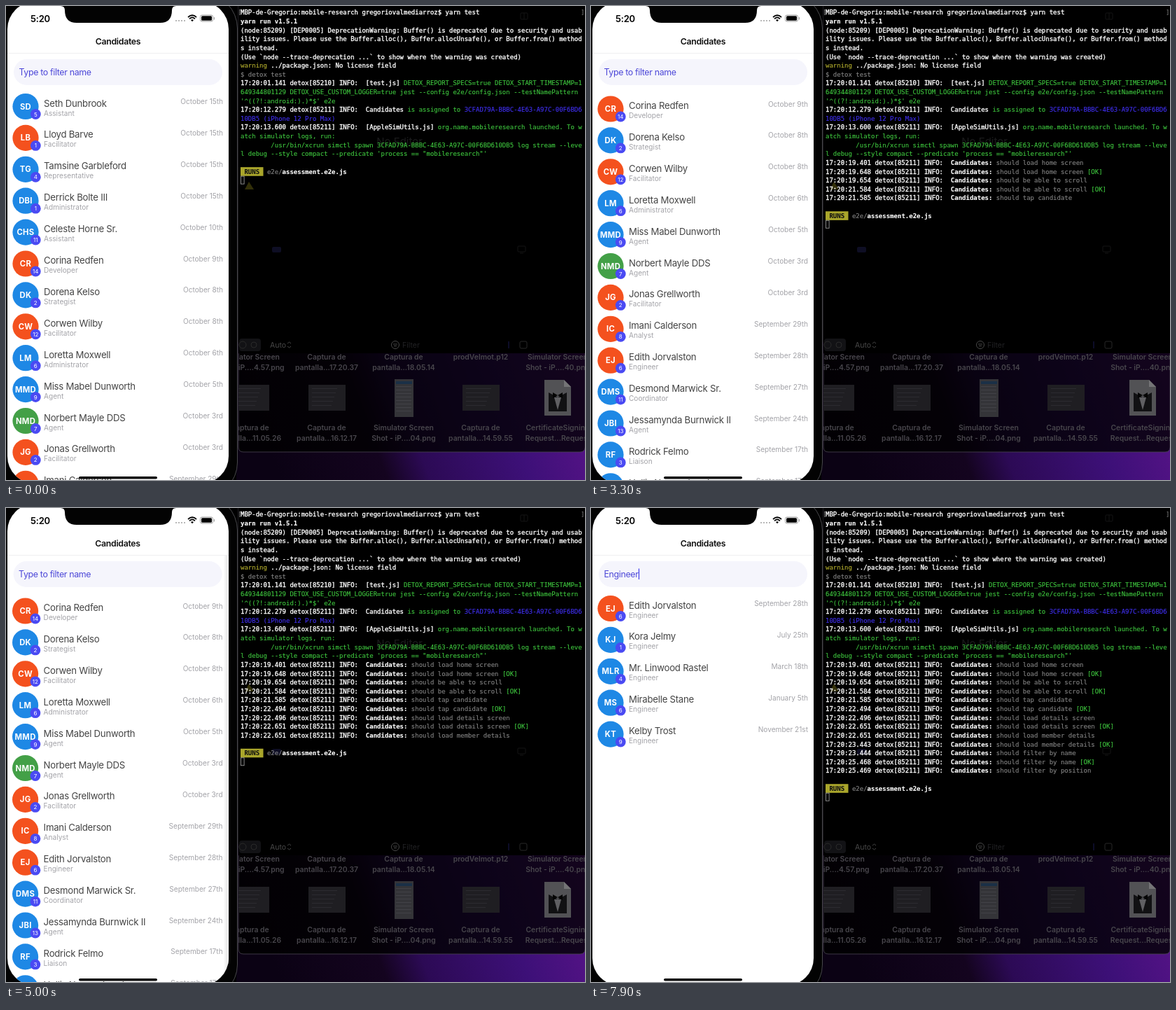
Animation of 827 by 677 pixels, one loop 8000 ms. Source, as an HTML page:

```html
<!DOCTYPE html>
<html lang="en">
<head>
<meta charset="utf-8">
<title>Candidates test run</title>
<style>
  html, body { margin: 0; width: 100%; height: 100%; overflow: hidden; background: #000; }
  svg { display: block; width: 827px; height: 677px; }
  text { white-space: pre; font-family: Inter, "Open Sans", sans-serif; }
  .term text { font: 9px "DejaVu Sans Mono", "Liberation Mono", monospace; }
  .term .bold { font-weight: 700; }
  .name { font-size: 13.2px; letter-spacing: -.25px; fill: #444; }
  .small { font-size: 10.1px; fill: #a3a3a8; }
  .initials { font-weight: 700; fill: #fff; text-anchor: middle; }
  .title { font-size: 12.3px; font-weight: 600; letter-spacing: -.3px; fill: #111; text-anchor: middle; }
  .label { font-size: 13px; letter-spacing: -.2px; fill: #b3b3b9; }
  .field { font-size: 12.4px; letter-spacing: -.35px; fill: #4d48d8; }
  .icon { font-size: 10.4px; font-weight: 600; fill: #48464c; text-anchor: middle; }
  .end { text-anchor: end; }
</style>
</head>
<body>
<svg id="stage" viewBox="0 0 827 677">
  <defs>
    <linearGradient id="wall" x1="0" y1=".15" x2="1" y2="0">
      <stop offset="0" stop-color="#0b0214"/><stop offset=".3" stop-color="#14041f"/>
      <stop offset=".42" stop-color="#2c0a55"/><stop offset=".7" stop-color="#3d1078"/>
      <stop offset="1" stop-color="#5f148c"/>
    </linearGradient>
    <linearGradient id="shade" x1="0" x2="1">
      <stop offset="0" stop-opacity="0"/><stop offset="1" stop-opacity=".1"/>
    </linearGradient>
    <clipPath id="right"><rect x="332" y="496" width="495" height="141"/></clipPath>
    <clipPath id="screen"><rect x="2" y="-6" width="316" height="688" rx="39"/></clipPath>
    <clipPath id="body"><rect x="2" y="68" width="316" height="620"/></clipPath>
    <clipPath id="viewport"><rect x="2" y="121" width="316" height="560"/></clipPath>
  </defs>
  <rect width="827" height="677"/>
  <rect x="329" y="480" width="498" height="197" fill="url(#wall)"/>
  <path d="M332 0H827V630Q827 637 820 637H339Q332 637 332 630Z" fill="#000" fill-opacity=".79" stroke="#4b4651" stroke-width=".8"/>
  <g id="desktop" clip-path="url(#right)"></g>
  <rect x="332" width="495" height="496" fill="#000"/>
  <g id="editor" fill="none" stroke="#141415">
    <text x="562" y="199" font-size="15" text-anchor="middle" fill="#1b1b1c" stroke="none">No Editor</text>
    <path d="M347 251L354 262H341Z" fill="#333009" stroke="none"/>
    <rect x="380" y="344" width="13" height="8" rx="2" fill="#0e0e24" stroke="none"/>
    <rect x="731" y="343" width="11" height="8" rx="1"/><path d="M734 353H739"/>
    <rect x="735" y="10" width="10" height="9" rx="1"/><path d="M740 10V19"/>
    <rect x="333" y="475" width="31" height="18" rx="4" fill="#121215" stroke="none"/>
    <circle cx="338" cy="484" r="5" stroke="#2a2a2a"/><circle cx="354" cy="484" r="4" stroke="#2a2a2a"/>
    <text x="377" y="488" font-size="10.5" fill="#484848" stroke="none">Auto</text>
    <path d="M402 482L404.500 480L407 482M402 486L404.500 488L407 486" stroke="#484848"/>
    <circle cx="556" cy="484" r="5.500" stroke="#484848"/><path d="M553 483H559M554 485.500H558" stroke="#484848"/>
    <text x="566" y="488" font-size="10.500" fill="#222224" stroke="none">Filter</text>
    <path d="M718 479V489" stroke="#191950"/><rect x="734" y="479" width="10" height="10" rx="2" stroke="#282828"/>
  </g>
  <g id="term" class="term"></g>

  <rect x="-40" y="-18" width="370.500" height="720" rx="50" fill="#030303" stroke="#48484c"/>
  <g clip-path="url(#screen)">
    <rect width="320" height="677" fill="#fff"/>
    <g clip-path="url(#body)">
      <g id="home">
        <rect x="11" y="76" width="298" height="37" rx="18.500" fill="#f5f5fc"/>
        <text id="query" class="field" x="18.500" y="99"></text>
        <rect id="caret" y="86.500" width="1.300" height="15.500" fill="#4b48ee"/>
        <g id="lists" clip-path="url(#viewport)"></g>
        <rect id="thumb" x="313" width="2.500" height="50" rx="1.200" fill="#a2a2a2"/>
      </g>
      <g id="detail">
        <rect x="-4" y="67" width="6" height="620" fill="url(#shade)"/>
        <rect x="2" y="67" width="320" height="620" fill="#fff"/>
        <circle cx="159.500" cy="129.500" r="55.300" fill="#1e88e5"/>
        <text class="initials" x="158.500" y="141.500" font-size="34">JBI</text>
      </g>
    </g>
    <path d="M2 67.500H318" stroke="#efeff1"/>
    <text id="homeTitle" class="title" x="160" y="55">Candidates</text>
    <text id="detailTitle" class="title" x="160" y="55">Jessamynda Burnwick II</text>
    <g id="back">
      <path d="M16.500 45L10 51L16.500 57" fill="none" stroke="#0a7aff" stroke-width="2" stroke-linecap="round" stroke-linejoin="round"/>
      <text x="22" y="55.500" font-size="12.600" letter-spacing="-.25" fill="#0a7aff">Back</text>
    </g>
    <text x="49" y="22.500" font-size="13" font-weight="600" text-anchor="middle" letter-spacing="-.2">5:20</text>
    <path d="M242 21H256" stroke="#b8b8b8" stroke-width="2" stroke-dasharray="2 2"/>
    <path d="M260 16Q266 10.500 272 16M262 18.300Q266 14.600 270 18.300" fill="none" stroke="#000" stroke-width="1.700"/>
    <path d="M264 20Q266 18.300 268 20L266 22.200Z"/>
    <rect x="277.500" y="13" width="18" height="9" rx="2.500" fill="none" stroke="#999"/>
    <rect x="279" y="14.300" width="15" height="6.400" rx="1.500"/><path d="M297.500 16V19.500" stroke="#999"/>
    <path d="M78 0Q84 0 84 6Q84 24 101 24H220Q237 24 237 6Q237 0 243 0Z" fill="#030303"/>
    <rect x="104" y="672" width="112" height="3.600" rx="1.800"/>
    <circle id="touch" fill="#fff" fill-opacity=".55" stroke="#8f8f8f" stroke-width="1.300"/>
  </g>
</svg>
<script>
const LOOP = 8000, TICK = 100, ROW = 44.9, SCROLL = 221;
const $ = id => document.getElementById(id);
const clamp = x => Math.max(0, Math.min(1, x));

function add(parent, tag, attrs, text) {
  const node = document.createElementNS('http://www.w3.org/2000/svg', tag);
  for (const key in attrs) node.setAttribute(key, attrs[key]);
  if (text !== undefined) node.textContent = text;
  return parent.appendChild(node);
}
const show = (node, visible) => node.setAttribute('display', visible ? 'inline' : 'none');
const shift = (node, x, y = 0) => node.setAttribute('transform', `translate(${x} ${y})`);

// Desktop icons
const capture = time => ['Captura de', 'pantalla...' + time];
const shot = end => ['Simulator Screen', `Shot - iP....${end}.png`];
const icons = [
  [shot('4.57'), capture('17.20.37'), capture('18.05.14'), ['prodVelmot.p12'], shot('40')],
  [capture('11.05.26'), capture('16.12.17'), shot('04'), capture('14.59.55'), ['CertificateSigning', 'Request...Request']]
];
icons.forEach((row, r) => row.forEach((label, c) => label.forEach((line, i) =>
  add($('desktop'), 'text', { class: 'icon', x: 348 + c * 110, y: 505 + r * 101 + i * 14.5 }, line))));
for (const x of [323, 432, 652]) {
  add($('desktop'), 'rect', { x, y: 541, width: 53, height: 37, fill: '#1f1e22' });
  for (let y = 546; y < 574; y += 6)
    add($('desktop'), 'rect', { x: x + 5, y, width: 20 + y * 7 % 22, height: 1, fill: '#2c2b30' });
}
add($('desktop'), 'rect', { x: 555, y: 533, width: 27, height: 54, fill: '#343438' });
add($('desktop'), 'rect', { x: 557, y: 536, width: 23, height: 4, fill: '#1b3047' });
for (let y = 543; y < 580; y += 5) add($('desktop'), 'rect', { x: 557, y, width: 22, height: 1, fill: '#424247' });
add($('desktop'), 'path', { d: 'M769 534H797L807 544V585H769Z', fill: '#525255' });
add($('desktop'), 'path', { d: 'M797 534V544H807Z', fill: '#747476' });
add($('desktop'), 'path', { d: 'M775 552L788 559L801 552V579H775Z', fill: '#111113' });
add($('desktop'), 'path', { d: 'M783 559L788 577L793 559Z', fill: '#606063' });
add($('desktop'), 'path', { d: 'M781 552L788 556L795 552V560L788 556L781 560Z', fill: '#050505' });

// Terminal: the first letter of each span picks its colour
const inks = { w: '#fff', b: '#fff', g: '#3fc83f', u: '#4130f5', y: '#b9b32f', d: '#858585', k: '#111' };
const LINE = 12.62;
function termLine(parent, spans, row) {
  const line = add(parent, 'text', { x: 335, y: 12.4 + row * LINE });
  for (const [ink, ...letters] of spans)
    add(line, 'tspan', {
      fill: inks[ink], stroke: inks[ink], 'stroke-width': ink === 'w' ? .35 : .12,
      class: 'bk'.includes(ink) ? 'bold' : ''
    }, letters.join(''));
  return line;
}
const stamp = (time, pid = 85211) => `w17:20:${time} detox[${pid}] INFO:  `;
const intro = [
  ['wMBP-de-Gregorio:mobile-research gregoriovalmediarroz$ yarn test'],
  ['byarn run v1.5.1'],
  ['w(node:85209) [DEP0005] DeprecationWarning: Buffer() is deprecated due to security and usab'],
  ['wility issues. Please use the Buffer.alloc(), Buffer.allocUnsafe(), or Buffer.from() method'],
  ['ws instead.'],
  ['w(Use `node --trace-deprecation ...` to show where the warning was created)'],
  ['ywarning', 'w ../package.json: No license field'],
  ['d$ detox test'],
  [stamp('01.141', 85210), 'w[test.js] ', 'gDETOX_REPORT_SPECS=true DETOX_START_TIMESTAMP=1'],
  ['g649344801129 DETOX_USE_CUSTOM_LOGGER=true jest --config e2e/config.json --testNamePattern'],
  ["g'^((?!:android:).)*$' e2e"],
  [stamp('12.279'), 'wCandidates', 'g is assigned to ', 'u3CFAD79A-BBBC-4E63-A97C-00F6BD6'],
  ['u10DB5 (iPhone 12 Pro Max)'],
  [stamp('13.600'), 'w[AppleSimUtils.js] ', 'gorg.name.mobileresearch launched. To w'],
  ['gatch simulator logs, run:'],
  ['g        /usr/bin/xcrun simctl spawn 3CFAD79A-BBBC-4E63-A97C-00F6BD610DB5 log stream --leve'],
  ['gl debug --style compact --predicate \'process == "mobileresearch"\'']
];
intro.forEach((spans, i) => termLine($('term'), spans, i));
add($('term'), 'text', { x: 331, y: 12.4, fill: '#888' }, '[');
add($('term'), 'text', { x: 821, y: 12.4, fill: '#888' }, ']');

// [time shown, log stamp, test, passed]
const logs = [
  [1100, '19.401', 'load home screen'], [1400, '19.648', 'load home screen', 1],
  [1400, '19.654', 'be able to scroll'], [3300, '21.584', 'be able to scroll', 1],
  [3300, '21.585', 'tap candidate'], [4200, '22.494', 'tap candidate', 1],
  [4200, '22.496', 'load details screen'], [4400, '22.651', 'load details screen', 1],
  [4400, '22.651', 'load member details'], [5200, '23.443', 'load member details', 1],
  [5200, '23.444', 'filter by name'], [7200, '25.468', 'filter by name', 1],
  [7200, '25.469', 'filter by position']
].map(([at, time, test, ok], i) => ({
  at, node: termLine($('term'), [stamp(time), 'bCandidates:', 'd should ' + test + ' ', ok ? 'g[OK]' : 'd'], 17 + i)
}));
const runs = add($('term'), 'g', {});
add(runs, 'rect', { x: 335, y: 3, width: 32.5, height: 12.6, fill: '#aaa62b' });
termLine(runs, ['k RUNS ', 'd e2e/', 'bassessment.e2e.js'], 0);
add(runs, 'rect', { x: 335.5, y: 16, width: 4.6, height: 11, fill: 'none', stroke: '#999', 'stroke-width': .9 });

// Candidates: name, initials, colour, badge, position, date
const colours = { b: '#1e88e5', o: '#f4511e', g: '#43a047' };
const people = `Seth Dunbrook|SD|b|5|Assistant|October 15th
Lloyd Barve|LB|o|1|Facilitator|October 15th
Tamsine Garbleford|TG|b|4|Representative|October 15th
Derrick Bolte III|DBI|b|1|Administrator|October 15th
Celeste Horne Sr.|CHS|b|11|Assistant|October 10th
Corina Redfen|CR|o|14|Developer|October 9th
Dorena Kelso|DK|b|2|Strategist|October 8th
Corwen Wilby|CW|o|12|Facilitator|October 8th
Loretta Moxwell|LM|b|6|Administrator|October 6th
Miss Mabel Dunworth|MMD|b|9|Agent|October 5th
Norbert Mayle DDS|NMD|g|7|Agent|October 3rd
Jonas Grellworth|JG|o|2|Facilitator|October 3rd
Imani Calderson|IC|o|8|Analyst|September 29th
Edith Jorvalston|EJ|o|6|Engineer|September 28th
Desmond Marwick Sr.|DMS|b|11|Coordinator|September 27th
Jessamynda Burnwick II|JBI|b|13|Agent|September 24th
Rodrick Felmo|RF|b|3|Liaison|September 17th
Hollis Normanbrook|HN|b|4|Planner|September 17th`.split('\n');
const named = ['Sabina Ostwick|SO|b|3|Strategist|June 14th'];
const engineers = [people[13], 'Kora Jelmy|KJ|b|1|Engineer|July 25th',
  'Mr. Linwood Rastel|MLR|b|4|Engineer|March 18th',
  'Mirabelle Stane|MS|b|6|Engineer|January 5th', 'Kelby Trost|KT|b|9|Engineer|November 21st'];

function makeList(entries) {
  const list = add($('lists'), 'g', {});
  entries.forEach((entry, i) => {
    const [name, initials, colour, badge, position, date] = entry.split('|');
    const row = add(list, 'g', { transform: `translate(0 ${143.5 + i * ROW})` });
    add(row, 'circle', { cx: 28, cy: 0, r: 18.6, fill: colours[colour] });
    add(row, 'text', { class: 'initials', x: 28, y: 4, 'font-size': 11.3, 'letter-spacing': .3 }, initials);
    add(row, 'circle', { cx: 42.3, cy: 11, r: 7.4, fill: '#4a4af3' });
    add(row, 'text', { x: 42.3, y: 14, 'font-size': 8, fill: '#fff', 'text-anchor': 'middle' }, badge);
    add(row, 'text', { class: 'name', x: 54, y: 0 }, name);
    add(row, 'text', { class: 'small', x: 54, y: 13 }, position);
    add(row, 'text', { class: 'small end', x: 310, y: -3.5 }, date);
  });
  return list;
}
const [allList, nameList, engineerList] = [people, named, engineers].map(makeList);

[['Position', 'Agent'], ['Status', 'waiting'], ['Experience', '13 years'],
 ['Application', 'September 24th 2018'], ['Email', 'junestallowmere@brivoko.io'], ['Age', '41']]
  .forEach(([label, value], i) => {
    const y = 213 + i * 40.45;
    add($('detail'), 'text', { class: 'label', x: 16.5, y }, label);
    add($('detail'), 'text', { class: 'name end', x: 301, y }, value);
  });

// Critically damped spring from 0 to 1
function spring(ms) {
  const x = Math.max(0, ms) * .01826;
  return 1 - Math.exp(-x) * (1 + x);
}

const taps = [[3320, 160, 596], [4440, 81, 51], [5390, 160, 94]];
function touchAt(t, scrolled) {
  if (t >= 1400 && t < 2250) return { x: 160, y: 433 + 214 - scrolled, r: 16.7, a: t > 2150 ? .4 : 1 };
  for (const [at, x, y] of taps) {
    const age = t - at;
    if (age >= 0 && age < 250) return { x, y, r: 17 + clamp((age - 100) / 150) * 15, a: 1 - clamp((age - 140) / 110) };
  }
  return null;
}

function typed(t) {
  if (t < 5900) return '';
  if (t < 7700) return 'Sabina'.slice(0, 2 + Math.floor((t - 5900) / 100) * 2);
  return 'Engineer'.slice(0, t < 7800 ? 4 : 8);
}

function render(t) {
  let shown = 0;
  for (const { at, node } of logs) {
    show(node, t >= at);
    if (t >= at) shown++;
  }
  shift(runs, 0, (18 + shown) * LINE);

  const scrolled = SCROLL * clamp((t - 1490) / 630);
  shift(allList, 0, -scrolled);
  show(allList, t < 7000);
  show(nameList, t >= 7000 && t < 7900);
  show(engineerList, t >= 7900);
  $('thumb').setAttribute('y', 123 + scrolled * .173);
  $('thumb').setAttribute('opacity', t < 1500 ? 0 : 1 - clamp((t - 2250) / 350));

  const query = typed(t);
  $('query').textContent = query || 'Type to filter name';
  show($('caret'), query);
  $('caret').setAttribute('x', 18.8 + $('query').getComputedTextLength());

  const open = spring(t - 3570) - spring(t - 4583);
  shift($('home'), -95 * open);
  shift($('detail'), 316 * (1 - open));
  show($('detail'), open > .001);
  shift($('homeTitle'), -110 * open);
  $('homeTitle').setAttribute('opacity', clamp(1 - open * 1.6));
  shift($('detailTitle'), 60 * (1 - open));
  $('detailTitle').setAttribute('opacity', clamp(open * 1.6 - .5));
  $('back').setAttribute('opacity', clamp(open * 1.6 - .5));

  const touch = touchAt(t, scrolled);
  show($('touch'), touch);
  if (touch) {
    $('touch').setAttribute('cx', touch.x);
    $('touch').setAttribute('cy', touch.y);
    $('touch').setAttribute('r', touch.r);
    $('touch').setAttribute('opacity', touch.a);
  }
}

const start = performance.now();
function frame() {
  const t = (performance.now() - start) % LOOP;
  render(Math.floor(t / TICK) * TICK);
  requestAnimationFrame(frame);
}
frame();
</script>
</body>
</html>
```
